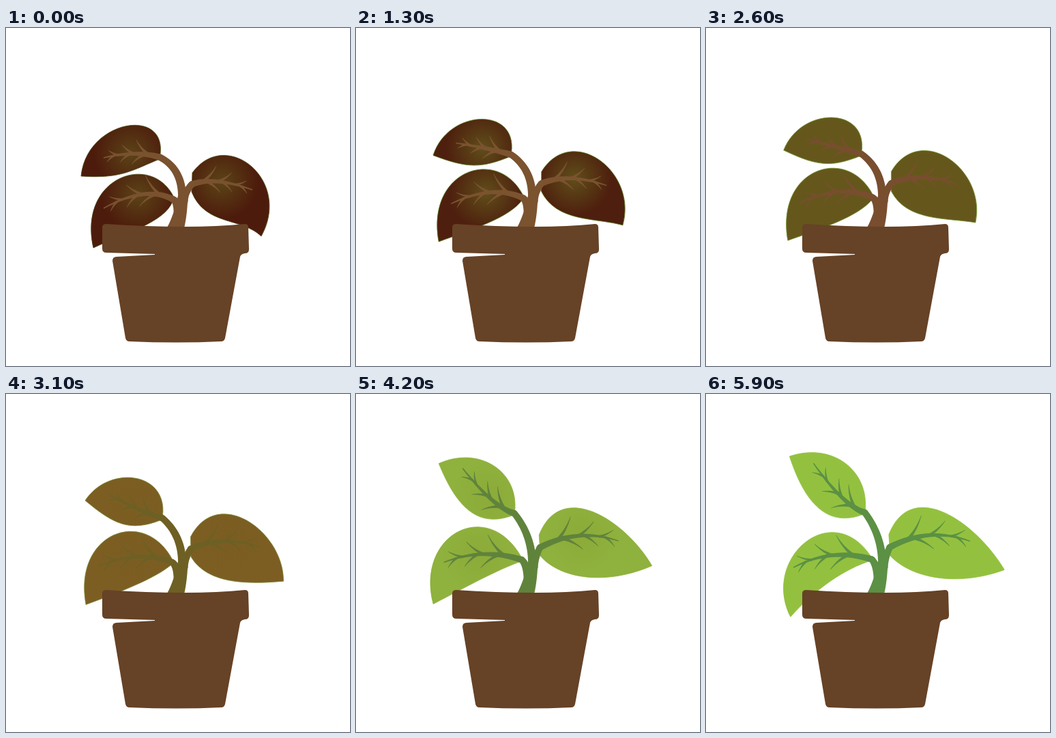
Animation, 504 px wide and 495 px high, one loop 6 s. Source, as an HTML page with a canvas:

```html
<!DOCTYPE html>
<html lang="en">
<head>
<meta charset="utf-8">
<title>Potted plant</title>
<style>
html, body { margin: 0; width: 100%; height: 100%; overflow: hidden; background: #fff; }
canvas { display: block; }
</style>
</head>
<body>
<canvas id="stage" width="504" height="495"></canvas>
<script>
const ctx = document.getElementById('stage').getContext('2d');
const LOOP = 6000, STEP = 100;

const easeIn = u => u ** 2.5, easeOut = u => 1 - (1 - u) ** 2.4, linear = u => u;

// lift: 0 is wilted, 1 is fresh. curl: how far the tips bend up. ease: towards the next key.
const keys = [
  { t: 0,    lift: 0,    curl: 0,   ease: linear,  inner: '5a4116', outer: '4d1b0c', edge: '4a4a10', vein: '7a5230' },
  { t: 1300, lift: .25,  curl: .3,  ease: linear,  inner: '5e4b19', outer: '4e1f0e', edge: '557a1a', vein: '7b532f' },
  { t: 2100, lift: .27,  curl: .35, ease: easeIn,  inner: '60561b', outer: '60551b', edge: '6f9a2a', vein: '7a4a31' },
  { t: 3100, lift: .5,   curl: .35, ease: linear,  inner: '7b5d22', outer: '7c5e22', edge: '7c8a35', vein: '6e6024' },
  { t: 3700, lift: .82,  curl: .2,  ease: easeOut, inner: '7d7c2d', outer: '868f38', edge: '869339', vein: '6a672a' },
  { t: 5000, lift: 1,    curl: 0,   ease: easeOut, inner: '93c13f', outer: '93c13f', edge: '93c13f', vein: '5c9044' },
  { t: 5900, lift: 1.03, curl: -1,  ease: linear,  inner: '93c13f', outer: '93c13f', edge: '93c13f', vein: '5c9044' }
];

// Pose points: tip, two controls, upper heel, lower heel, two controls, midrib control and end.
const leaves = [
  { wilted: [110,217, 118,135, 235,115, 226,185, 225,192, 185,208, 170,221, 190,179, 143,190],
    fresh: [122,95, 183,72, 239,112, 233,171, 232,176, 177,198, 145,160, 202,165, 157,104],
    stem: [[258, 243], [256, 205]], width: 12, sway: 0, side: 1 },
  { wilted: [128,322, 105,218, 212,182, 245,246, 244,254, 232,285, 175,300, 205,230, 143,264],
    fresh: [113,308, 85,207, 192,148, 243,240, 243,244, 205,256, 160,282, 185,224, 128,246],
    stem: [[253, 282], [253, 254]], width: 15, sway: .15, side: 1 },
  { wilted: [374,305, 420,222, 322,145, 273,212, 272,240, 292,290, 345,277, 305,217, 361,237],
    fresh: [437,249, 395,185, 300,122, 268,206, 270,237, 300,270, 368,281, 326,194, 386,214],
    stem: [[261, 254], [262, 240]], width: 11, sway: -.06, side: -1 }
];

const pot = new Path2D('M147 287Q205 291 262 291Q310 291 350 287Q355 287 355 292L356 324Q356 330 350 330' +
  'Q344 331 343 335L321 454Q320 459 315 459Q250 462 181 459Q176 459 175 454L156 341Q156 335 162 335' +
  'L218 332L218 331L147 329Q141 329 141 323L141 292Q141 287 147 287Z');

const mix = (a, b, u) => a + (b - a) * u;
const mixPoint = (a, b, u) => [mix(a[0], b[0], u), mix(a[1], b[1], u)];
const mixColor = (a, b, u) => 'rgb(' + [0, 2, 4].map(i =>
  Math.round(mix(parseInt(a.slice(i, i + 2), 16), parseInt(b.slice(i, i + 2), 16), u))) + ')';
const distance = (a, b) => Math.hypot(b[0] - a[0], b[1] - a[1]);
const direction = (a, b) => Math.atan2(b[1] - a[1], b[0] - a[0]);
const polar = ([x, y], angle, r) => [x + r * Math.cos(angle), y + r * Math.sin(angle)];

const quad = (a, c, b, t) => mixPoint(mixPoint(a, c, t), mixPoint(c, b, t), t);
const quadAngle = (a, c, b, t) => direction(mixPoint(a, c, t), mixPoint(c, b, t));

// Fills a quadratic curve whose width runs from w0 to w1, with a round start.
function taper(a, c, b, w0, w1) {
  const left = [], right = [], n = 16;
  for (let i = 0; i <= n; i++) {
    const t = i / n, p = quad(a, c, b, t), normal = quadAngle(a, c, b, t) + Math.PI / 2, r = mix(w0, w1, t) / 2;
    left.push(polar(p, normal, r));
    right.unshift(polar(p, normal, -r));
  }
  ctx.beginPath();
  left.concat(right).forEach(p => ctx.lineTo(...p));
  ctx.fill();
  ctx.beginPath();
  ctx.arc(...a, w0 / 2, 0, 2 * Math.PI);
  ctx.fill();
}

function posePoints({ wilted, fresh, sway }, lift, curl) {
  const pts = [];
  for (let i = 0; i < fresh.length; i += 2)
    pts.push([mix(wilted[i], fresh[i], lift), mix(wilted[i + 1], fresh[i + 1], lift)]);
  const joint = mixPoint(pts[3], pts[4], .6), reach = distance(joint, pts[0]);
  // The bend grows towards the tip.
  const bent = pts.map(p => {
    const r = distance(joint, p);
    return polar(joint, direction(joint, p) + sway * curl * (r / reach) ** 3, r);
  });
  return [joint, ...bent];
}

function drawLeaf(leaf, lift, curl, color) {
  const [joint, tip, u1, u2, heelU, heelL, l1, l2, bend, end] = posePoints(leaf, lift, curl);
  const rib = [joint, bend, end], mid = quad(...rib, .55);

  const glow = ctx.createRadialGradient(...mid, 4, ...mid, 54);
  glow.addColorStop(0, color.inner);
  glow.addColorStop(1, color.outer);
  ctx.beginPath();
  ctx.moveTo(...tip);
  ctx.bezierCurveTo(...u1, ...u2, ...heelU);
  ctx.lineTo(...heelL);
  ctx.bezierCurveTo(...l1, ...l2, ...tip);
  ctx.fillStyle = glow;
  ctx.fill();
  ctx.strokeStyle = color.edge;
  ctx.lineWidth = .8;
  ctx.stroke();

  ctx.fillStyle = color.vein;
  taper(...leaf.stem, joint, leaf.width, 9.5);
  taper(...rib, 9.5, 1.5);

  // Pairs of side veins, shorter towards the tip.
  const size = distance(joint, end);
  for (let i = 0; i < 3; i++) for (const side of [1, -1]) {
    const t = (side > 0 ? .23 : .3) + .27 * i;
    const turn = side * leaf.side * (.75 - .08 * i);
    const r = size * (side > 0 ? .34 : .29) * (1 - .22 * i);
    const start = quad(...rib, t), angle = quadAngle(...rib, t);
    taper(start, polar(start, angle + turn * .7, r * .5), polar(start, angle + turn, r), 6 - 3 * t, .6);
  }
}

function draw(time) {
  const last = keys.length - 2;
  const i = Math.min(last, keys.findLastIndex(k => k.t <= time));
  const from = keys[i], to = keys[i + 1];
  const u = from.ease((time - from.t) / (to.t - from.t));
  const color = {};
  for (const name of ['inner', 'outer', 'edge', 'vein']) color[name] = mixColor(from[name], to[name], u);

  ctx.fillStyle = '#fff';
  ctx.fillRect(0, 0, 504, 495);
  for (const leaf of leaves) drawLeaf(leaf, mix(from.lift, to.lift, u), mix(from.curl, to.curl, u), color);
  ctx.fillStyle = color.vein;
  taper([247, 298], [257, 273], [260, 238], 25, 13);
  ctx.fillStyle = '#664226';
  ctx.fill(pot);
}

const begin = performance.now();
function tick() {
  const time = (performance.now() - begin) % LOOP;
  draw(Math.floor(time / STEP) * STEP);
  requestAnimationFrame(tick);
}
tick();
</script>
</body>
</html>
```
